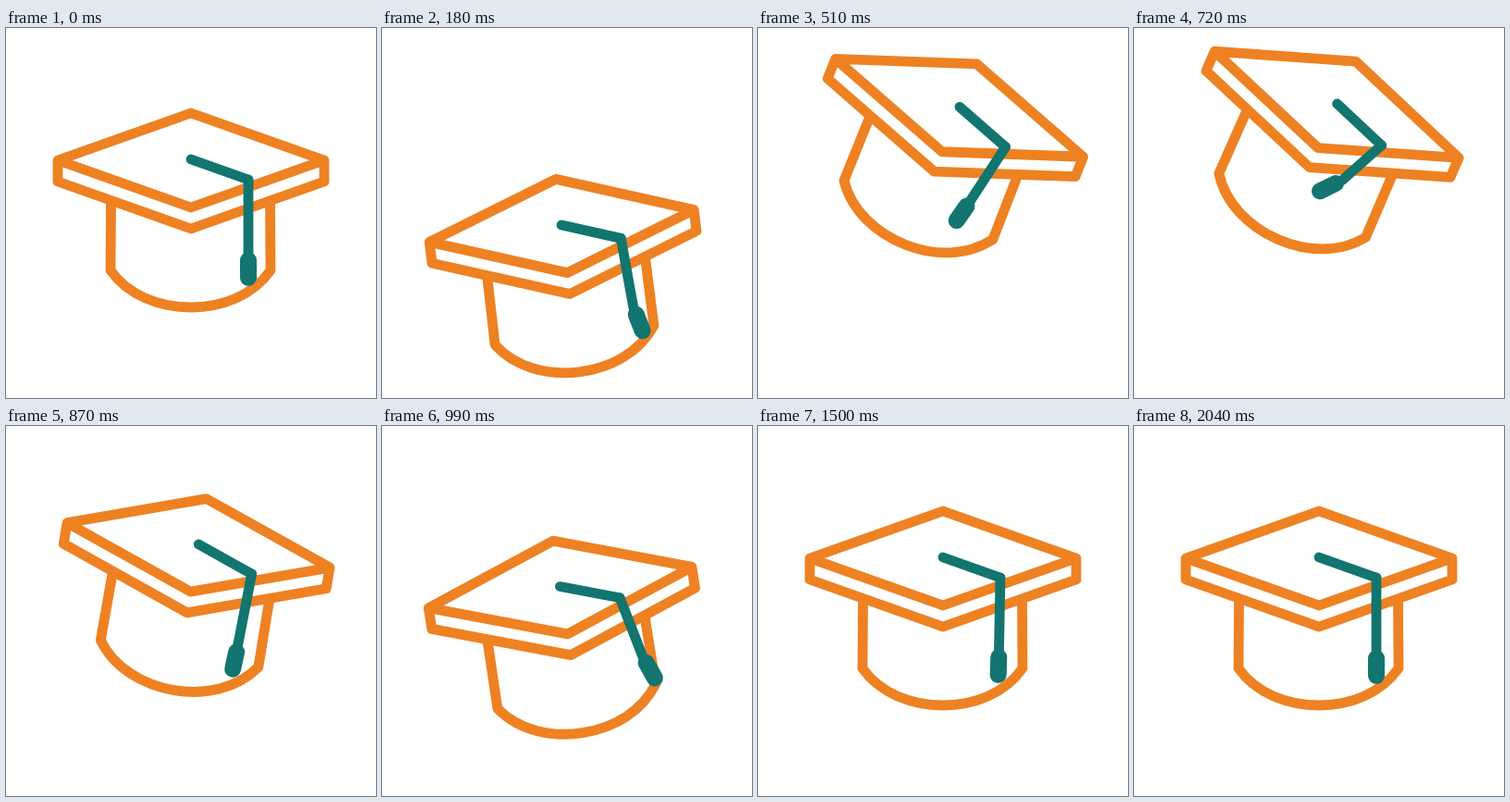
Write an HTML page that moves like this. It is 400 px wide and 400 px high and loops after 2.75 s.

```html
<!DOCTYPE html>
<html lang="en">
<head>
<meta charset="utf-8">
<title>Graduation cap toss</title>
<style>
  html, body { margin: 0; width: 100%; height: 100%; overflow: hidden; background: #fff; }
  svg { display: block; width: 100%; height: 100%; }
  g { fill: none; stroke-linecap: round; stroke-linejoin: round; stroke-width: 10.8; }
  #cap { stroke: #ee8122; }
  #tassel { stroke: #127570; }
</style>
</head>
<body>
<svg viewBox="0 0 400 400">
  <g id="cap">
    <path d="M113.5 187L113 262C132 289 166 302 200 302S267 289 286 262L285.5 187" stroke-linecap="butt"/>
    <path d="M56 143L200 92L344 143L200 194ZV166L200 217L344 166V143"/>
    <g id="tassel">
      <path d="M200 142L262 164"/>
      <g id="cord">
        <path id="thread"/>
        <path id="bead" d="M0 8V27" stroke-width="18"/>
      </g>
    </g>
  </g>
</svg>
<script>
const LOOP = 2750, STEP = 30, TILT_LAG = 20, CORD = 79;
const el = id => document.getElementById(id);

// Smooth step from 0 to 1: p below 0.5 leans on a long slow-down, above 0.5 on a slow start
function ease(u, p) {
  let lo = 0, hi = 1;
  for (let i = 0; i < 24; i++) {
    const s = (lo + hi) / 2;
    if (3 * p * s * (1 - s) + s ** 3 < u) lo = s; else hi = s;
  }
  return lo * lo * (3 - 2 * lo);
}

// Value at time t of a motion through the given poses
function follow({ times, eases }, poses, t) {
  const i = times.findIndex(time => time > t);
  if (i < 1) return 0;
  const u = (t - times[i - 1]) / (times[i] - times[i - 1]);
  return poses[i - 1] + (poses[i] - poses[i - 1]) * ease(u, eases ? eases[i - 1] : 0.5);
}

// Crouch, toss, catch, settle
const toss = { times: [0, 200, 630, 1000, 1350], eases: [0.5, 0.31, 0.67, 0.33] };
const drop = [0, 71.7, -69.5, 31.2, 0];
const tilt = [0, -7.4, 24.6, -9.6, 0];

// Wind up, whip to a peak, then halve with each swing
const sway = { times: [0, 300, 700, 1000, 1290, 1690, 2040] };
const whip = (windUp, peak) => [0, windUp, peak, -peak / 2, peak / 4, -peak / 8, 0];
const swing = whip(-4.8, 25);
const flick = whip(-16, 16);

function draw(now) {
  const t = Math.floor(now % LOOP / STEP) * STEP;
  const angle = follow(sway, swing, t);
  const length = CORD - 0.9 * Math.abs(angle);
  el("cap").setAttribute("transform",
    `translate(0 ${follow(toss, drop, t)}) rotate(${follow(toss, tilt, t - TILT_LAG)} 200 191)`);
  el("cord").setAttribute("transform", `translate(262 164) rotate(${angle})`);
  el("thread").setAttribute("d", `M0 0V${length}`);
  el("bead").setAttribute("transform", `translate(0 ${length}) rotate(${follow(sway, flick, t)})`);
}

const start = performance.now();
function tick() {
  draw(performance.now() - start);
  requestAnimationFrame(tick);
}
tick();
</script>
</body>
</html>
```
